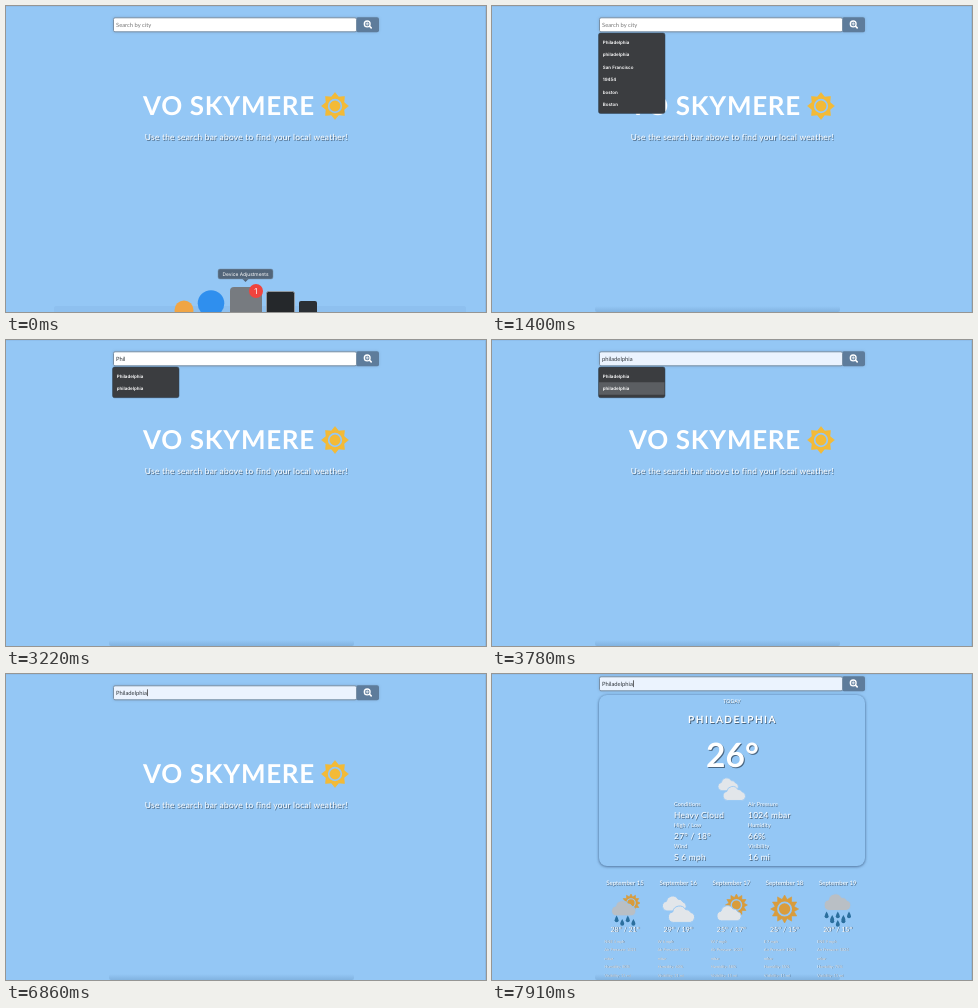
Animation of 480 by 306 pixels, one loop 8000 ms. Source, as an HTML page:

```html
<!DOCTYPE html>
<html lang="en">
<head>
<meta charset="utf-8">
<title>Weather search</title>
<style>
html, body { margin: 0; width: 100%; height: 100%; overflow: hidden; background: #94c7f5; }
svg { display: block; width: 100%; height: 100%; }
text { font-family: Lato, sans-serif; white-space: pre; text-rendering: geometricPrecision; }
.ui { font-family: Inter, sans-serif; }
</style>
</head>
<body>
<svg id="stage" viewBox="0 0 480 306"></svg>
<script>
const LOOP = 8000, STEP = 70, SKY = '#94c7f5';
const stage = document.getElementById('stage');
const $ = id => document.getElementById(id);
const clamp = v => Math.max(0, Math.min(1, v));
const easeOut = v => 1 - (1 - v) ** 2;
const smooth = v => v * v * (3 - 2 * v);

function text(x, y, size, str, extra = '') {
  return `<text x="${x}" y="${y}" font-size="${size}" ${extra}>${str}</text>`;
}
// White lettering with a dark copy just below and to the right
function shaded(x, y, size, str, extra = '', d = 0.8) {
  return text(x + d, y + d, size, str, `fill="#33475c" opacity=".75" ${extra}`) +
    text(x, y, size, str, `fill="#fff" ${extra}`);
}
function rect(x, y, w, h, fill, r = 0, extra = '') {
  return `<rect x="${x}" y="${y}" width="${w}" height="${h}" rx="${r}" fill="${fill}" ${extra}/>`;
}
function circle(x, y, r, fill, extra = '') {
  return `<circle cx="${x}" cy="${y}" r="${r}" fill="${fill}" ${extra}/>`;
}
function group(x, y, body, scale = 1) {
  return `<g transform="translate(${x} ${y}) scale(${scale})">${body}</g>`;
}
function sun(x, y, R, rays, depth, fill) {
  const pts = Array.from({ length: rays * 2 }, (_, i) => {
    const a = i * Math.PI / rays, r = i % 2 ? R * depth : R;
    return `${(x + r * Math.cos(a)).toFixed(2)},${(y + r * Math.sin(a)).toFixed(2)}`;
  }).join(' ');
  return `<polygon points="${pts}" fill="${fill}" stroke="${fill}" stroke-width=".6" stroke-linejoin="round"/>` +
    circle(x, y, R * 0.47, 'none', `stroke="${SKY}" stroke-width="${R * 0.13}"`);
}
function cloud(x, y, scale, fill) {
  return group(x, y, `<path d="M-8 7A5 5 0 0 1-8.6-2.9A6.5 6.5 0 0 1 3.5-5.2A5 5 0 0 1 8.5-2.4A4.8 4.8 0 0 1 8 7Z" fill="${fill}" stroke="${SKY}" stroke-width=".9"/>`, scale);
}
function drops(n, y) {
  return Array.from({ length: n }, (_, i) =>
    group((i - (n - 1) / 2) * 5.6, y + (i % 2) * 3.5,
      '<path d="M0-3.4Q2 0 2 1.2A2 2 0 0 1-2 1.2Q-2 0 0-3.4Z" fill="#2b6f9e"/>')).join('');
}

const GOLD = '#d99c3c', GREY = '#b9bfc5', PALE = '#e2e6ea';
const twoClouds = cloud(-3, -4, 0.8, PALE) + cloud(3, 5, 0.88, PALE);
const icons = {
  showers: sun(6, -6, 9, 12, 0.7, GOLD) + cloud(-1, 0, 0.98, GREY) + drops(4, 10),
  heavy: group(0, 0, twoClouds, 1.2),
  light: sun(5, -4, 11, 12, 0.7, GOLD) + cloud(-2, 5, 0.98, PALE),
  clear: sun(0, 0, 14, 12, 0.7, GOLD),
  rain: cloud(0, -6, 1.08, GREY) + drops(5, 6) + drops(3, 11)
};

const rows = ['Philadelphia', 'philadelphia', 'San Francisco', '19454', 'boston', 'Boston'];
const facts = [
  ['Conditions', 'Heavy Cloud', 'Air Pressure', '1024 mbar'],
  ['High / Low', '27° / 18°', 'Humidity', '66%'],
  ['Wind', 'S 6 mph', 'Visibility', '16 mi']
];
const days = [
  ['showers', '28° / 21°', 'NNE 4 mph', 1021, 80],
  ['heavy', '29° / 19°', 'W 6 mph', 1020, 60],
  ['light', '25° / 17°', 'W 7 mph', 1022, 58],
  ['clear', '25° / 15°', 'E 7 mph', 1025, 55],
  ['rain', '20° / 15°', 'ENE 9 mph', 1024, 75]
];
const middle = 'text-anchor="middle"';

function home() {
  return text(137, 109.2, 26, 'VO SKYMERE', 'fill="#fff" font-weight="700" letter-spacing=".7"') +
    sun(329, 100, 13.4, 8, 0.72, '#f3ba37') +
    shaded(240.3, 133.8, 8.4, 'Use the search bar above to find your local weather!', `${middle} letter-spacing=".24"`);
}

function searchBar() {
  return rect(107, 11.3, 266, 15, '#5e7c9b', 2, 'filter="url(#soft)" opacity=".35"') +
    rect(350, 11.3, 23, 15, '#5e7c9b', 2) +
    rect(107.5, 11.8, 243, 14, '#fff', 1.5, 'id="field" stroke="#7990a6"') +
    text(110, 20.7, 5.8, '', 'id="query"') +
    rect(0, 15.3, 0.7, 6.8, '#222', 0, 'id="caret"') +
    `<g fill="none" stroke="#fff" stroke-linecap="round">
      <circle cx="361.2" cy="17.9" r="2.9" stroke-width="1.3"/>
      <path d="M363.6 20.3L365.2 21.9" stroke-width="1.6"/>
      <path d="M359.9 17.9h2.6M361.2 16.6v2.6" stroke-width=".8"/></g>`;
}

function dropdown() {
  return rect(106.5, 27, 66.5, 80.5, '#3b3d40', 2, 'id="panel" stroke="#2f4255" stroke-width=".5"') +
    rect(107, 29.8, 65.5, 12.5, '#5b5e62', 0, 'id="hover"') +
    rows.map((s, i) => text(110.8, 37.9 + i * 12.45, 4.5, s,
      `class="ui row" fill="#fff" font-weight="600"`)).join('');
}

function card() {
  let s = rect(107, 33.5, 266, 171, '#3c5f86', 8, 'filter="url(#soft)"') +
    rect(107, 33, 266, 171, SKY, 8) +
    shaded(240, 41, 5.2, 'TODAY', middle, 0.5) +
    shaded(240.5, 60.7, 10, 'PHILADELPHIA', `${middle} font-weight="700" letter-spacing="1.45"`) +
    shaded(240.5, 105.2, 33.5, '26°', `${middle} font-weight="700"`, 1) +
    group(239.5, 127, twoClouds, 1.03);
  facts.forEach((f, i) => {
    const y = 144 + i * 21;
    for (const c of [0, 1]) {
      const x = 182 + c * 74;
      s += shaded(x, y, 5.4, f[c * 2], 'letter-spacing=".12"', 0.5) +
        shaded(x, y + 11.8, 8.4, f[c * 2 + 1], 'letter-spacing=".28"');
    }
  });
  return s;
}

function forecast() {
  return days.map(([icon, temp, wind, bar, hum], i) => {
    const x = 133 + i * 53.2;
    const lines = [wind, `Air Pressure: ${bar}`, 'mbar', `Humidity: ${hum}%`, 'Visibility: 11 mi'];
    return shaded(x, 211.2, 6.1, `September ${15 + i}`, middle, 0.5) +
      group(x, 235, icons[icon]) +
      shaded(x, 257.6, 7.1, temp, middle) +
      lines.map((s, k) => shaded(x - 20.5, 268.6 + k * 8.5, 3.9, s, '', 0.35)).join('');
  }).join('');
}

function dock() {
  return rect(48, 300, 412, 8, '#6d9cc8', 2, 'opacity=".15"') +
    circle(178, 304, 9.5, '#f0a545') +
    circle(205, 297.5, 13.3, '#2f8fee') +
    rect(224, 281, 32, 32, '#777b80', 4) +
    rect(260.5, 285.5, 28, 28, '#25282b', 2, 'stroke="#8f979e"') +
    rect(293, 295, 18, 18, '#2b2f34', 2) +
    circle(250, 285, 7, '#f0443e') +
    text(250, 287.8, 8, '1', `class="ui" fill="#fff" ${middle}`);
}

function tip() {
  return '<path d="M236 272.5h7L239.5 276Z" fill="#526579"/>' +
    rect(212, 263, 55, 10, '#526579', 2, 'stroke="#7590ab" stroke-width=".5"') +
    text(239.5, 269.8, 4.9, 'Device Adjustments', `class="ui" fill="#fff" ${middle}`);
}

stage.innerHTML = `<defs>
  <filter id="soft" x="-10%" y="-30%" width="120%" height="170%"><feGaussianBlur stdDeviation="1.8"/></filter>
  <linearGradient id="edge" x2="0" y2="1"><stop stop-color="#6f9fcb" stop-opacity="0"/><stop offset="1" stop-color="#6f9fcb" stop-opacity=".5"/></linearGradient>
  </defs>` + rect(0, 0, 480, 306, SKY) + rect(479, 0, 1, 306, '#8ab9e4') +
  rect(0, 0, 480, 0.6, '#8bbae6') +
  `<g id="home">${home()}</g><g id="results"><g id="card">${card()}</g><g id="days">${forecast()}</g></g>
  <g id="bar">${searchBar()}</g><g id="list">${dropdown()}</g>` +
  rect(103, 300, 245, 6, 'url(#edge)', 2, 'id="shade"') +
  `<g id="dock">${dock()}</g><g id="tip">${tip()}</g>`;

const rowEls = [...document.querySelectorAll('.row')];
const show = (id, on) => { $(id).style.display = on ? '' : 'none'; };
const move = (id, y) => $(id).setAttribute('transform', `translate(0 ${y})`);

const typing = [[1820, 'P'], [2310, 'Ph'], [2520, 'Phi'], [2730, 'Phil'],
  [3640, 'Philadelphia'], [3780, 'philadelphia'], [4480, 'Philadelphia']];
const blinks = [1820, 3220, 4760, 5250, 5810, 6300, 6860, 7350, 7910];

function draw(t) {
  const tick = Math.floor(t / STEP) * STEP;

  const sink = smooth(clamp(tick / 560));
  show('dock', sink < 1);
  move('dock', 32 * sink);
  $('shade').setAttribute('opacity', sink);
  show('tip', t < 1400);
  const k = 1 - 0.4 * sink;
  $('tip').setAttribute('transform', `translate(${239.5 - 4.5 * sink} ${268 + 30 * sink}) scale(${k}) translate(-239.5 -268)`);
  $('tip').setAttribute('opacity', 1 - 0.95 * sink);

  const typed = typing.filter(e => t >= e[0]).pop();
  const query = $('query');
  query.textContent = typed ? typed[1] : 'Search by city';
  query.setAttribute('fill', typed ? '#30363d' : '#777');
  $('field').setAttribute('fill', t >= 3640 ? '#ebf3fe' : '#fff');
  show('caret', blinks.filter(b => t >= b).length % 2);
  $('caret').setAttribute('x', 110.2 + query.getComputedTextLength());

  show('list', t >= 1400 && t < 4760);
  $('panel').setAttribute('height', t < 2100 ? 80.5 : 30.7);
  rowEls.forEach((el, i) => { el.style.display = i < 2 || t < 1890 ? '' : 'none'; });
  show('hover', t >= 3640);
  move('hover', t >= 3780 && t < 4480 ? 12.45 : 0);

  const found = t >= 7490;
  const u = clamp((tick - 7490) / 420), p = easeOut(u);
  show('home', !found);
  show('results', found);
  move('bar', found ? -3 - 6 * p : 0);
  move('card', -12 * p);
  move('days', 12 * (1 - p));
  $('days').setAttribute('opacity', clamp(u * 1.6));
}

const start = performance.now();
function frame() {
  draw((performance.now() - start) % LOOP);
  requestAnimationFrame(frame);
}
frame();
</script>
</body>
</html>
```
